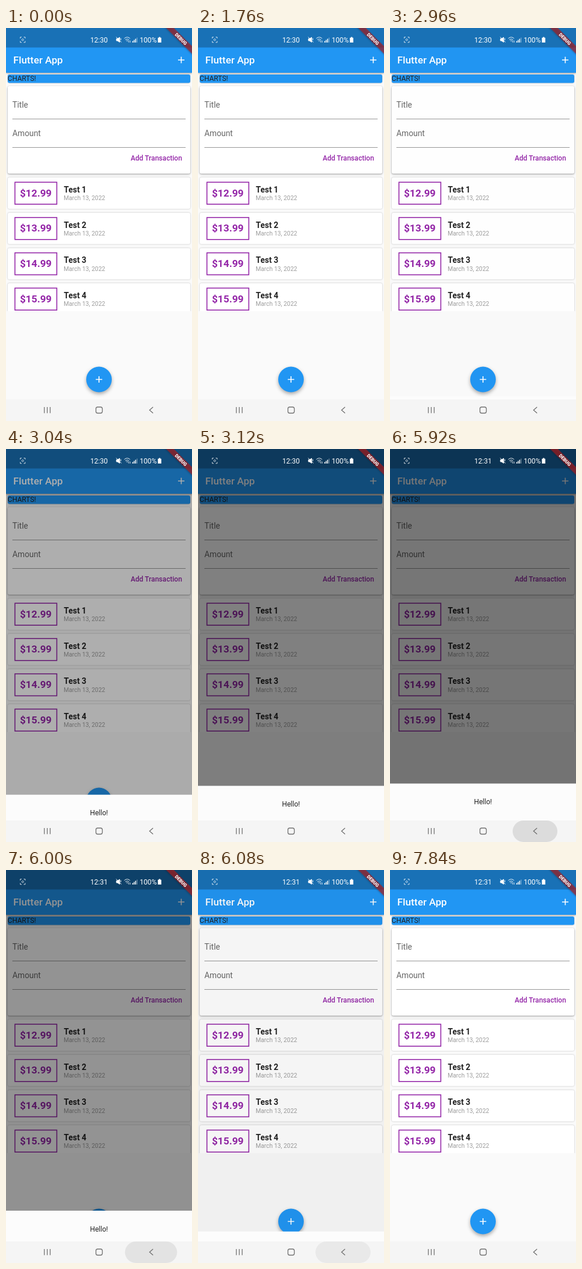
These frames come from a looping animation (320x676 px, 8000 ms). An HTML page:

```html
<!DOCTYPE html>
<html lang="en">
<head>
<meta charset="utf-8">
<title>Flutter App</title>
<style>
html, body { margin: 0; width: 100%; height: 100%; overflow: hidden; background: #fafafa; }
svg { display: block; width: 100vw; height: 100vh; }
text { font: 12.1px Roboto, sans-serif; fill: #212121; }
.white { fill: #fff; }
.title { font-size: 17.3px; font-weight: 500; fill: #fff; }
.label { font-size: 13.83px; fill: #666; }
.button { font-weight: 500; fill: #9426a8; text-anchor: end; }
.price { font-size: 17.3px; font-weight: 700; fill: #9426a8; text-anchor: middle; }
.name { font-size: 13.83px; font-weight: 700; }
.date { font-size: 10.37px; fill: #9e9e9e; }
.banner { font-size: 8px; font-weight: 900; fill: #fff; text-anchor: middle; }
.line { fill: none; stroke: #fff; stroke-width: 1.6; }
.low { filter: drop-shadow(0 .8px .8px #0004); }
.mid { filter: drop-shadow(0 1.6px 1.8px #0006); }
.high { filter: drop-shadow(0 3px 3px #0005); }
</style>
</head>
<body>
<svg viewBox="0 0 320 676">
  <defs>
    <clipPath id="listClip"><rect y="252" width="320" height="235"/></clipPath>
    <path id="plus" class="line" d="M-5.5 0H5.5M0-5.5V5.5"/>
  </defs>
  <rect width="320" height="676" fill="#fafafa"/>

  <rect class="low" x="3" y="80" width="314" height="14.5" rx="3" fill="#2196f3"/>
  <text x="2.8" y="91.3">CHARTS!</text>
  <rect class="mid" x="3" y="100" width="314" height="150.5" rx="3" fill="#fff"/>
  <text class="label" x="11" y="136.5">Title</text>
  <text class="label" x="11" y="185.5">Amount</text>
  <path d="M11 156.5H309M11 205.5H309" stroke="#8c8c8c" stroke-width=".9"/>
  <text class="button" x="303" y="228.3">Add Transaction</text>
  <g id="list" clip-path="url(#listClip)"></g>

  <rect class="mid" y="33" width="320" height="44" fill="#2196f3"/>
  <rect width="320" height="33.5" fill="#1971b6"/>
  <text class="title" x="12.6" y="61">Flutter App</text>
  <use href="#plus" x="301.5" y="55"/>

  <circle class="high" cx="160" cy="604.5" r="22" fill="#2196f3"/>
  <use href="#plus" x="160" y="604.5"/>

  <rect id="scrim" width="320" height="639"/>
  <g id="sheet">
    <rect y="575" width="320" height="64" fill="#fcfcfc"/>
    <text x="160" y="610.8" text-anchor="middle">Hello!</text>
  </g>

  <text id="clock" class="white" x="145" y="24.7"></text>
  <text class="white" x="230" y="24.7">100%</text>
  <g class="line" style="stroke-width:1">
    <path d="M24.5 18V15.7H27M30.500 15.700H33V18M33 22.500V24.800H30.500M27 24.800H24.500V22.500" opacity=".8"/>
    <circle id="dot" cx="28.7" cy="20.2" r="1.6" opacity=".7"/>
    <path d="M190 18.500H192L195.500 16V24.500L192 22H190Z" fill="#fff"/>
    <path d="M189.500 15.500L198.500 24.500M197.500 17.500V21"/>
    <path d="M203.500 18Q208.500 13.500 213.500 18M205.300 20.300Q208.500 17.500 211.700 20.300M207 22.300Q208.500 21 210 22.300" opacity=".9"/>
    <path d="M211 25V21.500M213.500 21.500V25" opacity=".8"/>
    <path d="M218 25V22.500M220.500 25V20.500M223 25V18.500" stroke-width="1.5"/>
    <path d="M225.500 25V16.500" opacity=".5"/>
  </g>
  <path class="white" d="M263 15.500H265.500V16.700H267.200V25H261.300V16.700H263Z"/>

  <g transform="translate(320 0) rotate(45)">
    <rect class="mid" x="-40" y="22" width="80" height="9.4" fill="#b71c1ca0"/>
    <text class="banner" y="29.6">DEBUG</text>
  </g>

  <rect y="639" width="320" height="37" fill="#f5f5f5"/>
  <rect id="press" y="639" height="37" rx="18.5"/>
  <g class="line" style="stroke:#707070;stroke-width:1.3">
    <path d="M66 652V662.500M71 652V662.500M76 652V662.500M253 652L247 657.200L253 662.500"/>
    <rect x="154.700" y="652" width="11" height="10.500" rx="3"/>
  </g>
</svg>
<script>
const LOOP = 8000, TICK = 80, OPEN = 2955, CLOSE = 5897, PRESS = 5920;
const $ = id => document.getElementById(id);
const clamp = v => Math.min(1, Math.max(0, v));

$("list").innerHTML = [1, 2, 3, 4].map(n => `
  <g transform="translate(0 ${(n - 1) * 60.7})">
    <rect class="low" x="3" y="257" width="314" height="54" rx="3" fill="#fff"/>
    <rect x="15.4" y="265.3" width="72" height="37.8" fill="none" stroke="#9426a8" stroke-width="1.6"/>
    <text class="price" x="51.2" y="289.8">$${11 + n}.99</text>
    <text class="name" x="99.6" y="283">Test ${n}</text>
    <text class="date" x="99.2" y="296.3">March 13, 2022</text>
  </g>`).join("");

function bezier(x1, y1, x2, y2) {
  const at = (u, a, b) => 3 * u * (1 - u) * ((1 - u) * a + u * b) + u ** 3;
  return x => {
    let lo = 0, hi = 1;
    for (let i = 0; i < 24; i++) {
      const mid = (lo + hi) / 2;
      if (at(mid, x1, x2) < x) lo = mid; else hi = mid;
    }
    return at(hi, y1, y2);
  };
}
const ease = bezier(.25, .1, .25, 1);
const decelerate = bezier(0, 0, .2, 1);

function draw(t) {
  const shown = t < 4500 ? clamp((t - OPEN) / 250) : 1 - clamp((t - CLOSE) / 200);
  $("scrim").setAttribute("opacity", shown ? .54 * ease(shown) : 0);
  $("sheet").setAttribute("transform", `translate(0 ${shown ? 64 * (1 - decelerate(shown)) : 64})`);

  $("clock").textContent = t < 3680 ? "12:30" : "12:31";
  const blink = Math.floor((t - (t < 4000 ? 320 : 400)) / 480);
  $("dot").style.display = blink % 2 ? "" : "none";

  // Back button ripple: widens quickly, then fades
  const p = (t - PRESS) / 480;
  const width = 77 + 20 * (1 - (1 - clamp(p)) ** 5.5);
  $("press").setAttribute("x", 249.5 - width / 2);
  $("press").setAttribute("width", width);
  $("press").setAttribute("opacity", p < 0 ? 0 : .1 * (1 - clamp(p)) ** 1.7);
}

const start = performance.now();
function frame() {
  const t = (performance.now() - start) % LOOP;
  draw(Math.floor(t / TICK) * TICK);
  requestAnimationFrame(frame);
}
frame();
</script>
</body>
</html>
```
